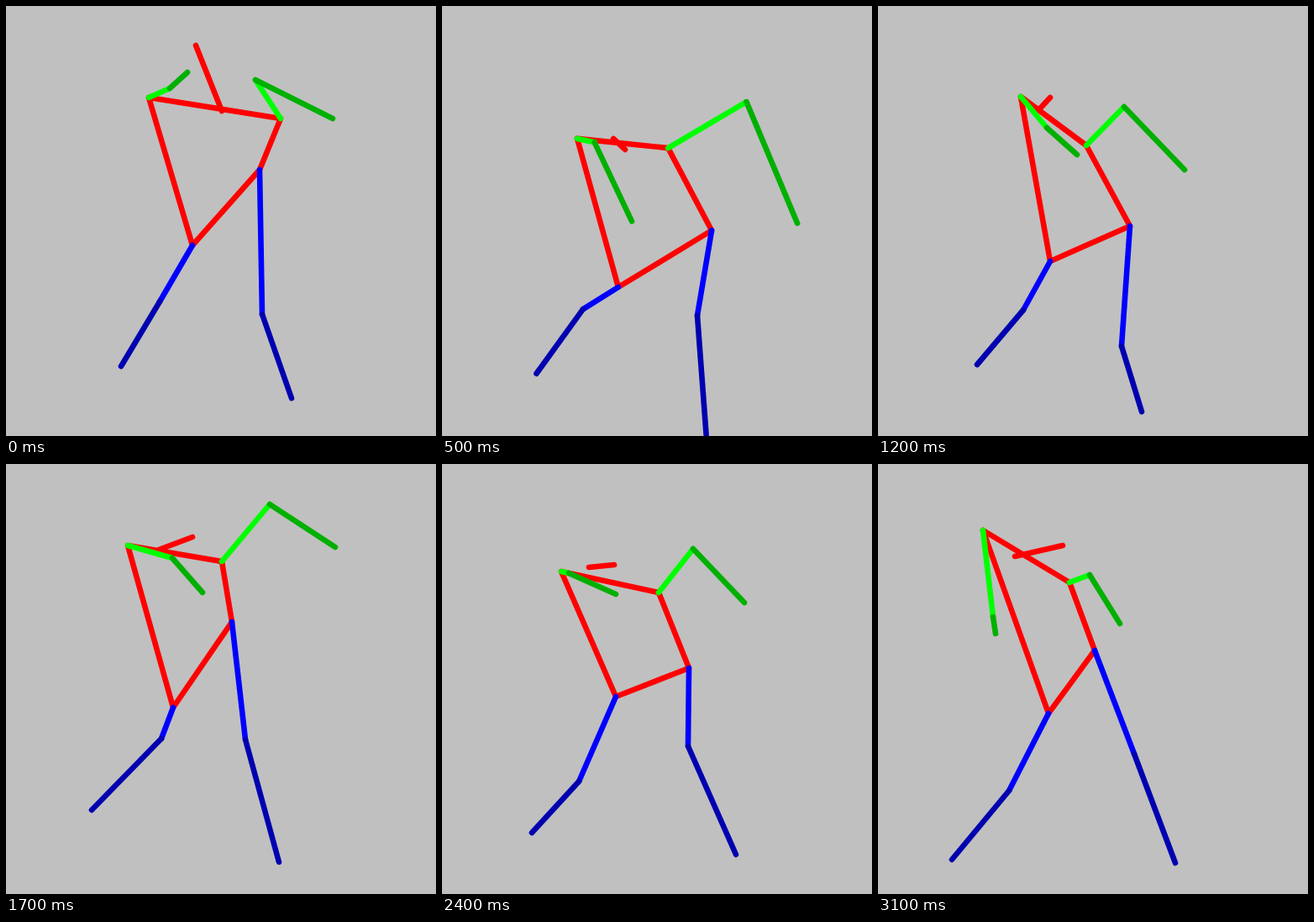
These frames come from a looping animation (512 px wide and 512 px high, 3.2 s). An HTML page:

```html
<!DOCTYPE html>
<html lang="en">
<head>
<meta charset="utf-8">
<title>Stick figure</title>
<style>
  html, body { margin: 0; width: 100%; height: 100%; overflow: hidden; background: #c0c0c0; }
  svg { display: block; width: 100vw; height: 100vh; }
  path { fill: none; stroke-width: 6.6; stroke-linecap: round; stroke-linejoin: round; }
</style>
</head>
<body>
<svg viewBox="0 0 512 512">
  <path id="torso" stroke="#f00"/>
  <path id="thighs" stroke="#00f"/>
  <path id="shins" stroke="#0000b0"/>
  <path id="upperArms" stroke="#0f0"/>
  <path id="forearms" stroke="#00b000"/>
</svg>
<script>
const LOOP = 3200, STEP = 100;
const KEY_TIMES = [0, 300, 800, 1200, 1700, 2400, 3100];

// A joint passes through one point per key time, plus optional [time, x, y] turning points.
function joint(points, turns = []) {
  const keys = points.map(([x, y], i) => [KEY_TIMES[i], x, y]);
  return keys.concat(turns).sort((a, b) => a[0] - b[0]);
}

const joints = {
  head: joint([[226, 47], [190, 139], [230, 171], [205, 109], [222, 87], [205, 120], [220, 97]]),
  neck: joint([[257, 125], [224, 152], [211, 189], [192, 123], [182, 102], [175, 123], [163, 110]]),
  shoulderL: joint([[170, 109], [167, 153], [153, 161], [170, 108], [145, 97], [142, 128], [125, 79]]),
  shoulderR: joint([[327, 134], [265, 150], [277, 191], [248, 166], [257, 116], [258, 153], [228, 141]]),
  hipL: joint([[222, 285], [215, 335], [205, 334], [205, 304], [199, 290], [207, 277], [203, 297]]),
  hipR: joint([[302, 195], [330, 256], [303, 275], [300, 262], [269, 188], [294, 243], [258, 222]]),
  elbowL: joint([[195, 98], [185, 147], [179, 174], [201, 145], [198, 112], [151, 130], [137, 182]]),
  elbowR: joint([[297, 88], [365, 74], [352, 188], [293, 120], [314, 48], [299, 101], [252, 132]],
    [[1500, 308, 32]]),
  handL: joint([[216, 79], [238, 234], [204, 271], [237, 177], [234, 153], [207, 155], [140, 202]]),
  handR: joint([[389, 134], [413, 216], [393, 296], [365, 195], [392, 99], [360, 165], [288, 190]],
    [[400, 427, 240], [2000, 418, 125]]),
  kneeL: joint([[183, 352], [180, 346], [149, 389], [173, 362], [185, 327], [163, 378], [156, 389]]),
  kneeR: joint([[305, 367], [304, 365], [304, 381], [290, 405], [285, 328], [293, 336], [305, 345]]),
  footL: joint([[137, 429], [108, 458], [147, 405], [118, 427], [102, 412], [107, 439], [88, 471]],
    [[400, 106, 450], [1800, 97, 415]]),
  footR: joint([[340, 467], [313, 501], [320, 499], [314, 483], [325, 474], [350, 465], [354, 475]],
    [[600, 316, 512], [1400, 318, 488], [2100, 340, 499], [2700, 362, 511], [3000, 356, 486]])
};

const bones = {
  torso: ["shoulderL shoulderR hipR hipL shoulderL", "neck head"],
  thighs: ["hipL kneeL", "hipR kneeR"],
  shins: ["kneeL footL", "kneeR footR"],
  upperArms: ["shoulderL elbowL", "shoulderR elbowR"],
  forearms: ["elbowL handL", "elbowR handR"]
};

// Monotone cubic interpolation: smooth, without overshoot.
function valueAt(keys, axis, time) {
  const slope = i => (keys[i + 1][axis] - keys[i][axis]) / (keys[i + 1][0] - keys[i][0]);
  const tangent = i => {
    if (i === 0) return slope(0);
    if (i === keys.length - 1) return slope(i - 1);
    const a = slope(i - 1), b = slope(i);
    return a * b > 0 ? 2 * a * b / (a + b) : 0;
  };
  let i = 0;
  while (i < keys.length - 2 && time >= keys[i + 1][0]) i++;
  const span = keys[i + 1][0] - keys[i][0];
  const u = (time - keys[i][0]) / span, v = 1 - u;
  return keys[i][axis] * (1 + 2 * u) * v * v
    + keys[i + 1][axis] * u * u * (3 - 2 * u)
    + span * u * v * (tangent(i) * v - tangent(i + 1) * u);
}

function draw() {
  const time = Math.floor(performance.now() % LOOP / STEP) * STEP;
  const point = name => [1, 2].map(axis => valueAt(joints[name], axis, time).toFixed(1));
  for (const [id, lines] of Object.entries(bones)) {
    const d = lines.map(line => "M" + line.split(" ").map(point).join("L")).join("");
    document.getElementById(id).setAttribute("d", d);
  }
  requestAnimationFrame(draw);
}
draw();
</script>
</body>
</html>
```
